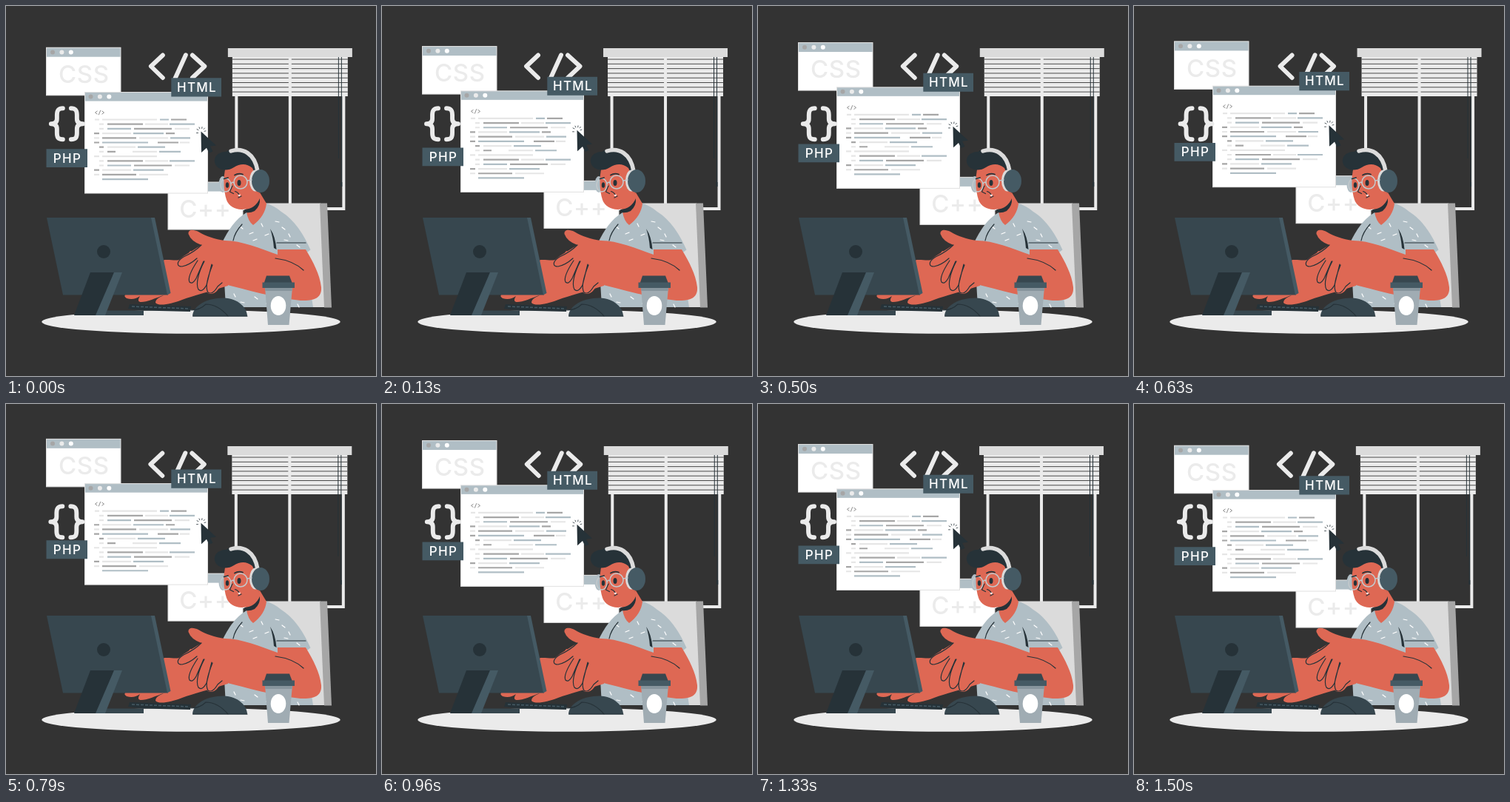
Animation of 500x500 px, one loop 1.54 s. Source, as an HTML page:

```html
<!DOCTYPE html>
<html lang="en">
<head>
<meta charset="utf-8">
<title>Programmer at work</title>
<style>
  html, body { margin: 0; height: 100%; overflow: hidden; background: #333; }
  svg { display: block; width: 100vw; height: 100vh; }
  text { font-family: Inter, sans-serif; text-anchor: middle; }
  .tag { font-size: 17px; font-weight: 500; letter-spacing: 1.3px; fill: #fff; }
  .lang { font-size: 33px; font-weight: 500; letter-spacing: .6px; fill: #ebebeb; }
  .pen { fill: none; stroke-linecap: round; stroke-linejoin: round; }
  .ink { stroke: #263238; stroke-width: 1.2; }
  .dark { fill: #263238; }
  .slate { fill: #37474f; }
  .steel { fill: #455a64; }
  .skin { fill: #de6854; }
  .shirt { fill: #b0bec5; }
</style>
</head>
<body>
<svg viewBox="0 0 500 500">
  <!-- Window with blinds -->
  <g class="shake">
    <path d="M311.500 69V274H456.500V69" fill="none" stroke="#ebebeb" stroke-width="4"/>
    <path d="M306 69H462V122H306z" fill="#ebebeb"/>
    <path id="slats" stroke="#4a4a4a"/>
    <path d="M384 69V274" stroke="#ebebeb" stroke-width="4"/>
    <path d="M449.500 69V206M453.500 69V244" stroke="#263238"/>
    <path d="M452.500 238h2v6h-2z" class="dark"/>
    <path d="M300 57H468V69H300z" fill="#dbdbdb"/>
  </g>

  <g transform="translate(0 .3)">
    <g class="float">
      <g id="windows"></g>
      <text class="lang" x="105.300" y="104">CSS</text>
      <text class="lang" x="269.300" y="286">C++</text>
    </g>
    <g class="float" id="editor"></g>
    <g class="float pen" stroke-width="2.200" style="stroke-linecap:butt">
      <path stroke="#e6e6e6" d="M120 153.500h6m4 0h74M126 159.700h6m56 0h31M126 165.900h6m96 0h20M130 172.100h39M119 178.300h7m54 0h39M235 184.500h13M137 190.700h38M126 196.900h6m39 0h33M119 203.100h7m4 0h74M126 209.300h6m56 0h31M126 215.500h6m96 0h20M130 221.700h39M119 227.900h7m54 0h39"/>
      <path stroke="#b0bec5" d="M208 153.500h12M221 159.700h34M137 165.900h32M172 172.100h41M222 178.300h27M130 184.500h62M178 190.700h37M207 196.900h29M221 209.300h34M137 215.500h32M172 221.700h41M130 234.100h62"/>
      <path stroke="#a6a6a6" d="M223 153.500h21M137 159.700h48M173 165.900h51M119 172.100h7m90 0h12M130 178.300h46M119 184.500h7m79 0h28M126 190.700h6M137 196.900h11M137 209.300h48M173 215.500h51M119 221.700h7M130 227.900h46"/>
      <path stroke="#8c8c8c" stroke-width="1" d="M123.500 141.800l-3 2.200 3 2.200M127.800 140.800l-2.600 6.400M129.500 141.800l3 2.200-3 2.200"/>
    </g>

    <g class="shake pen" stroke="#ebebeb" stroke-width="5.900">
      <path d="M212 66.200L196 81.200 212 96.700M243 66L228 99M252 66.200L268.500 81.200 252 96.700"/>
      <path d="M77 138C70 138 69 142 69 147V152Q69 159 61 159Q69 159 69 166V171C69 177 70 180 77 180M88 138C95 138 96 142 96 147V152Q96 159 104 159Q96 159 96 166V171C96 177 95 180 88 180"/>
    </g>

    <g class="float">
      <path class="steel" d="M54.500 193.200H110V218H54.500zM223.300 97.300H291V122.500H223.300z"/>
      <text class="tag" x="83" y="211.800">PHP</text>
      <text class="tag" x="258" y="115.800">HTML</text>
      <path class="dark" d="M263.500 169.500L284 188.500 276 189.500 279.500 196.500 274.500 198.700 271 191.700 264 198z"/>
      <path class="pen ink" style="stroke-width:.8" d="M257.500 171.500h2M258 166.500l2 1M261 163.800l.8 1.800M265 163.500l-.3 2M268.500 165l-1.400 1.500M270 168.800l-2 .5"/>
    </g>
  </g>

  <!-- Chair -->
  <path d="M345 266.500H425L431 407H330z" fill="#dbdbdb"/>
  <path d="M424 266.500H434L440 407.500H430z" fill="#a6a6a6"/>
  <ellipse cx="250" cy="426.800" rx="201.700" ry="16" fill="#ebebeb"/>

  <!-- Body -->
  <path class="shirt" d="M325 279C310 288 300 303 292 320L297 407H415L404 335 411.500 329.500C403 310 390 289 372 278Q363 270 350 266z"/>
  <path class="pen" id="dashes" stroke="#fff" stroke-width="1.200"/>
  <path class="skin" d="M323 268L343 252 352 267Q350 284 334 296Q327 291 325 278z"/>
  <path class="dark" d="M322 275Q337 274 343 260Q344 270 336 277 330 280 324 279z"/>

  <!-- Head -->
  <ellipse cx="293" cy="241" rx="5.500" ry="11" fill="#b0bec5"/>
  <path class="skin" d="M297 217C293 232 294 250 298 262C302 273 316 278 328 273Q337 268 343 250L338 212 310 210z"/>
  <path class="dark" d="M283 214C279 205 286 197 297 197C310 189 336 195 340 216L337 228 333 219C325 212 316 213 308 218C299 224 287 222 283 214z"/>
  <path class="pen" d="M304 196C320 191 336 199 340 223" stroke="#dbdbdb" stroke-width="5.500"/>
  <ellipse cx="337" cy="236" rx="8" ry="14.500" fill="#dbdbdb"/>
  <ellipse class="steel" cx="344" cy="236.500" rx="12" ry="15.500"/>
  <g class="pen" stroke="#c3c9cc" stroke-width="1.500">
    <circle cx="317" cy="238" r="9"/>
    <ellipse cx="297" cy="242" rx="7" ry="9"/>
    <path d="M304 240q2-3 4-1M326 236l6-1"/>
  </g>
  <ellipse class="dark" cx="315" cy="239" rx="2.500" ry="4"/>
  <ellipse class="dark" cx="299" cy="242" rx="2.200" ry="3.800"/>
  <path class="pen ink" style="stroke-width:1.800" d="M309 228.500q5-3 11-1M294.500 233.500l5.500-1.500"/>
  <path class="pen ink" d="M306 243l-3.500 8 5 2.500M309.500 250.500q4 1 5.500 4.500M314 259l4-2"/>
  <path d="M313 255.500l4-1-1 3z" fill="#fff"/>

  <!-- Arms and hands -->
  <path class="skin" d="M214 343C228 342 237 349 249 331L300 350V378C275 386 254 391 238 397C222 403 207 406 202 401C202 395 209 393 215 390C202 395 190 400 183 400Q176 400 181 392Q173 398 163 395Q158 392 163 387z"/>
  <path class="skin" d="M246.500 308C246 301 254 302 260 305C270 311 282 315 296 317C318 317 345 328 367 336V329H405C415 346 424 362 426 380C427 394 417 399 398 398C362 394 327 384 292 375Q284 390 276 389Q270 388 271 381Q262 389 258 379Q250 380 247 373Q245 366 250 356Q235 357 232 350Q229 346 240 338L264 323Q250 318 246.500 308z"/>
  <g class="pen ink">
    <path d="M264 323Q255 332 240 339C229 346 231 352 238 352Q248 350 258 341M259 344C251 356 245 367 248 373Q252 377 257 368L267 345M268 345C260 360 256 376 260 383Q265 388 271 377L278 349M279 350C273 365 269 381 273 387Q279 391 286 379L292 374"/>
    <path d="M364 341Q388 344 402 357M366 320H405M319 295Q309 306 307 317"/>
  </g>
  <path class="dark" d="M357 301Q364 311 365.500 329L362 327Q361 313 357 301z"/>

  <!-- Desk -->
  <path class="slate" d="M55 286H198L219 390.500H77z"/>
  <path class="steel" d="M196 286H201L222.500 388 218 390.500z"/>
  <circle class="dark" cx="132" cy="332" r="9"/>
  <path class="slate" d="M128 411.500H186V418H120z"/>
  <path class="dark" d="M114 360H146L124 418H92z"/>
  <path class="steel" d="M146 360H157L134 418H121z"/>
  <path class="dark" d="M167 403L250 406 249 413 186 411.500 165 409z"/>
  <path d="M170 406L247 409" stroke="#455a64" stroke-width="1.500" stroke-dasharray="4 2"/>
  <path class="slate" d="M252 419.500C252 406 270 394.500 294 394.500C314 395 326 408 326 419.500z"/>
  <path class="pen ink" d="M250 411Q262 411 270 403Q286 403 300 419M253 419H326"/>
  <path class="slate" d="M352 364.500H383L387 375H348.500z"/>
  <path d="M350 380H387L382.500 431H354z" fill="#a0acb3"/>
  <path d="M350 380H387L386.500 385H350.300z" fill="#87959d"/>
  <path class="steel" d="M346.500 373.500H390V381H346.500z"/>
  <ellipse cx="368" cy="405" rx="10.300" ry="13" fill="#fff"/>
</svg>
<script>
const $ = id => document.getElementById(id);

function browserWindow(x, y, width, height, bar, firstDot) {
  const dots = ['#a6a6a6', '#ebebeb', '#fff'].map((fill, i) =>
    `<circle cx="${firstDot + i * 12.4}" cy="${y + bar / 2}" r="3" fill="${fill}"/>`).join('');
  return `<rect x="${x}" y="${y}" width="${width}" height="${height}" fill="#fff"/>
    <rect x="${x}" y="${y}" width="${width}" height="${bar}" fill="#b0bec5"/>${dots}
    <rect x="${x}" y="${y}" width="${width}" height="${height}" fill="none" stroke="#e0e0e0"/>`;
}
$('windows').innerHTML =
  browserWindow(54.5, 56.2, 100.5, 64.5, 12.5, 63) +
  browserWindow(219, 238, 101, 64, 12.5, 227);
$('editor').innerHTML = browserWindow(106.5, 116.5, 166, 136.5, 12, 114.5);

$('slats').setAttribute('d',
  Array.from({ length: 8 }, (_, i) => `M306 ${72 + i * 6.3}H462`).join(''));

// Short strokes printed on the shirt, at alternating angles
const prints = [[316, 298], [329, 308], [345, 294], [364, 291], [373, 299], [350, 310], [382, 308],
  [376, 316], [393, 323], [334, 317], [308, 389], [317, 400], [336, 393], [352, 402], [394, 403]];
$('dashes').setAttribute('d', prints.map(([x, y], i) =>
  `M${x} ${y}l${[4, 5, 2, 5][i % 4]} ${[3, -2, 4, 1][i % 4]}`).join(''));

const LOOP = 1540, FPS = 24, CYCLE = 36;
const SHAKE = [0, -1, 2, -4, 4, -4, 4, -4, 2, -1, 0];
const floats = document.querySelectorAll('.float');
const shakes = document.querySelectorAll('.shake');
const move = (groups, x, y) =>
  groups.forEach(group => group.setAttribute('transform', `translate(${x} ${y})`));

function draw() {
  const step = Math.floor((performance.now() % LOOP + 5) * FPS / 1000);
  const phase = (step + 0.5) % CYCLE / CYCLE;
  const key = Math.floor(phase * 10);
  const x = SHAKE[key] + (SHAKE[key + 1] - SHAKE[key]) * (phase * 10 - key);
  move(shakes, x, 0);
  move(floats, 0, -10 * (1 - Math.abs(1 - 2 * phase)));
  requestAnimationFrame(draw);
}
draw();
</script>
</body>
</html>
```
